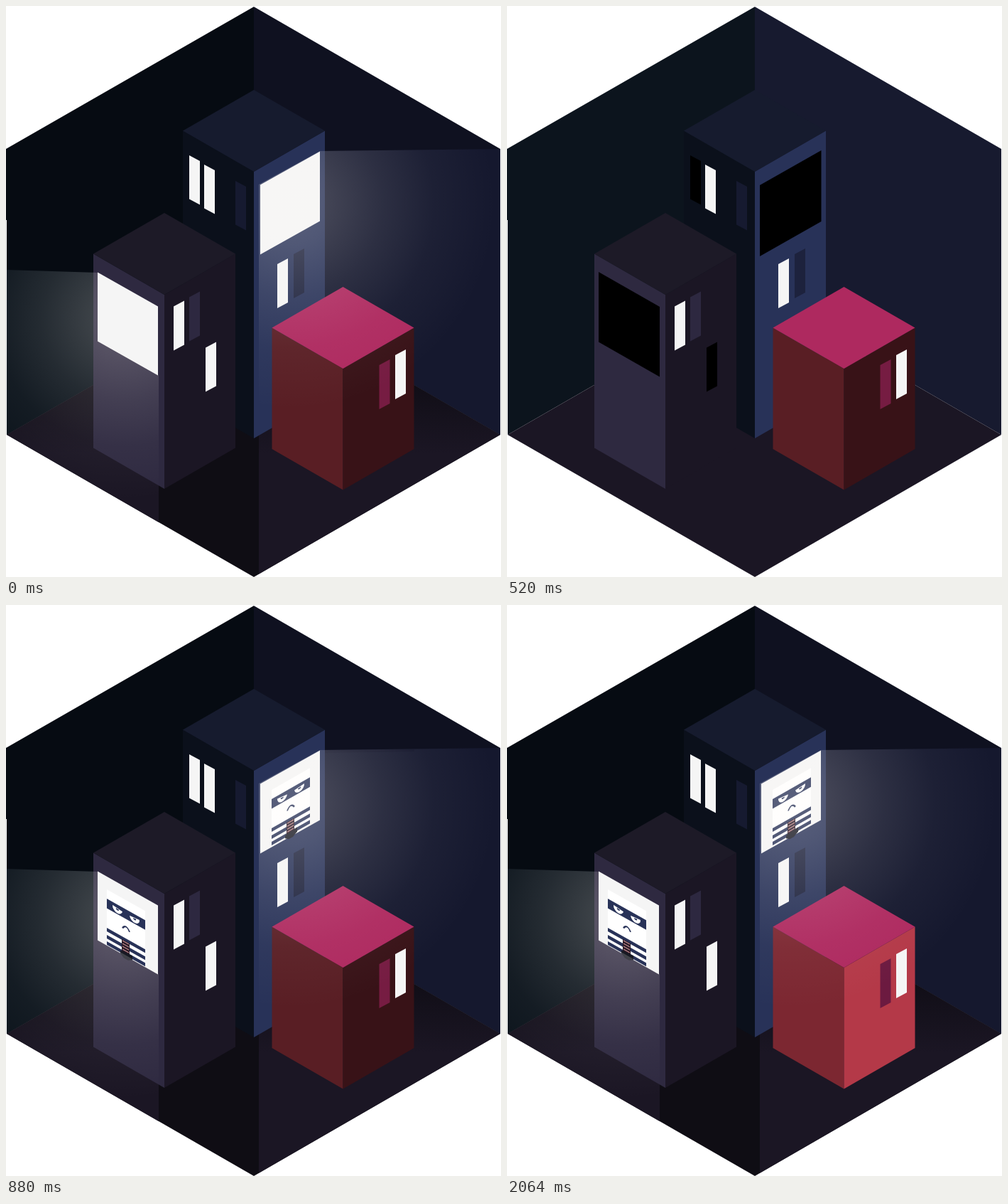
An HTML page with a canvas for the animation above (2800 ms loop, 697 by 803 pixels).

```html
<!DOCTYPE html>
<html lang="en">
<head>
<meta charset="utf-8">
<title>Night towers</title>
<style>
html, body { margin: 0; width: 100%; height: 100%; overflow: hidden; background: #fff; }
canvas { display: block; }
</style>
</head>
<body>
<canvas id="stage" width="697" height="803"></canvas>
<script>
const ctx = document.getElementById('stage').getContext('2d');
const LOOP = 2800, OFF_AT = 160, FACES_AT = 760, RED_AT = 960;
const WHITE = '#f5f5f5', NAVY = '#283258';

function trace(pts) {
  ctx.beginPath();
  for (let i = 0; i < pts.length; i += 2) ctx.lineTo(pts[i], pts[i + 1]);
  ctx.closePath();
}

function poly(color, ...pts) {
  trace(pts);
  ctx.fillStyle = color;
  ctx.fill();
}

// Parallelogram with vertical sides; rise is the slant across its width.
function panel(color, x, y, w, h, rise) {
  poly(color, x, y, x + w, y + rise, x + w, y + rise + h, x, y + h);
}

function tower(x, y, h, top, left, right) {
  panel(left, x - 100, y - 57.5, 100, h, 57.5);
  panel(right, x, y, 100, h, -57.5);
  poly(top, x, y - 115, x + 100, y - 57.5, x, y, x - 100, y - 57.5);
}

const leftWindow = (color, x, y) => panel(color, x, y, 15, 61.5, 8);
const rightWindow = (color, x, y) => panel(color, x, y, 15, 62, -8);

const beams = [
  { shape: [129, 375, 0, 371, 0, 301 + 70, 1, 603, 215, 727, 215, 519, 129, 470], x: 165, y: 440, r: 255 },
  { shape: [442, 204, 696, 201, 696, 603, 356, 799, 356, 251], x: 400, y: 278, r: 290 }
];

function inBeam(beam, paint) {
  ctx.save();
  trace(beam.shape);
  ctx.clip();
  paint(beam);
  ctx.restore();
}

function room(left, right, floor) {
  poly(left, 0, 201, 349, 1, 349, 403, 1, 603, 1, 301, 0, 301);
  poly(right, 349, 1, 696, 201, 696, 603, 349, 403);
  poly(floor, 349, 403, 696, 603, 349, 803, 1, 603);
}

function glow({ x, y, r }) {
  const g = ctx.createRadialGradient(x, y, 0, x, y, r);
  [[0, .24], [.2, .19], [.45, .1], [.7, .035], [1, 0]].forEach(([at, a]) =>
    g.addColorStop(at, `rgba(255,250,245,${a})`));
  ctx.fillStyle = g;
  ctx.fillRect(0, 0, 697, 803);
}

function litFloor() {
  const g = ctx.createLinearGradient(0, 535, 0, 630);
  g.addColorStop(0, '#110e17');
  g.addColorStop(1, '#1b1624');
  return g;
}

function eye(x, tilt) {
  ctx.save();
  ctx.translate(x, 18);
  ctx.rotate(tilt);
  ctx.beginPath();
  ctx.arc(0, 0, 7, 0, Math.PI);
  ctx.fillStyle = '#fff';
  ctx.fill();
  ctx.beginPath();
  ctx.arc(0, 1, 2.2, 0, Math.PI);
  ctx.fillStyle = NAVY;
  ctx.fill();
  ctx.restore();
}

function bandit(x, y, slope) {
  const bar = (color, u, v, w, h) => {
    ctx.fillStyle = color;
    ctx.fillRect(u, v, w, h);
  };
  ctx.save();
  ctx.transform(1, slope, 0, 1, x, y);
  bar('#fff', 0, 0, 54, 73);
  bar(NAVY, 0, 13, 54, 13.5);
  eye(15, .12);
  eye(39, -.12);
  ctx.beginPath();
  ctx.moveTo(22, 42);
  ctx.quadraticCurveTo(27, 33, 32, 42);
  ctx.strokeStyle = NAVY;
  ctx.lineWidth = 2;
  ctx.stroke();
  for (const v of [54, 64, 73]) bar(NAVY, 0, v, 54, 5);
  bar('#241724', 21, 58, 11, 19);
  for (let v = 59; v < 74; v += 4) bar('#b88286', 22, v, 9, 1.5);
  poly('#171923', 19, 75, 36, 73, 36, 79, 30, 83, 24, 83, 19, 79);
  ctx.restore();
}

function draw(t) {
  const lit = t < OFF_AT || t >= FACES_AT;
  const faces = t >= FACES_AT;
  const red = t >= RED_AT;
  const lamp = lit ? WHITE : '#000';

  ctx.fillStyle = '#fff';
  ctx.fillRect(0, 0, 697, 803);
  if (lit) {
    room('#060b12', '#0f1120', '#0f0d14');
    for (const b of beams) inBeam(b, () => room('#0c141c', '#15182e', litFloor()));
    if (faces && !red) poly('#12142a', 442, 204, 575, 203, 575, 206, 442, 208);
  } else {
    room('#0c141d', '#171a2f', '#1b1624');
  }

  tower(349, 233, 375, '#161b2e', '#0b101b', NAVY);
  leftWindow(lamp, 258, 210);
  leftWindow(WHITE, 279, 223);
  leftWindow('#161a30', 323, 246);
  rightWindow(WHITE, 382, 363);
  rightWindow('#1d223d', 405, 349);
  if (lit) panel(WHITE, 358, 251.5, 84, 98, -47);
  else panel('#000', 356, 252, 86.5, 100, -49);

  tower(223, 406, 273, '#1d1a27', '#2e2940', '#1b1624');
  rightWindow(WHITE, 236, 422.5);
  rightWindow('#2d2840', 258, 409.5);
  rightWindow(lamp, 281, 480.5);
  if (lit) panel(WHITE, 129, 374.5, 85, 97, 48);
  else panel('#000', 129, 374, 86, 98.5, 49);

  if (faces) {
    bandit(142, 400, .56);
    bandit(374, 260, -.57);
  }

  tower(474.5, 510, 170.5, '#ae295f', red ? '#7c2731' : '#591e24', red ? '#b43948' : '#381217');
  rightWindow(red ? '#6c1a40' : '#761c42', 525.5, 505);
  rightWindow(WHITE, 548, 491);

  if (lit) for (const b of beams) inBeam(b, glow);
}

const start = performance.now();
function tick() {
  draw((performance.now() - start) % LOOP);
  requestAnimationFrame(tick);
}
tick();
</script>
</body>
</html>
```
